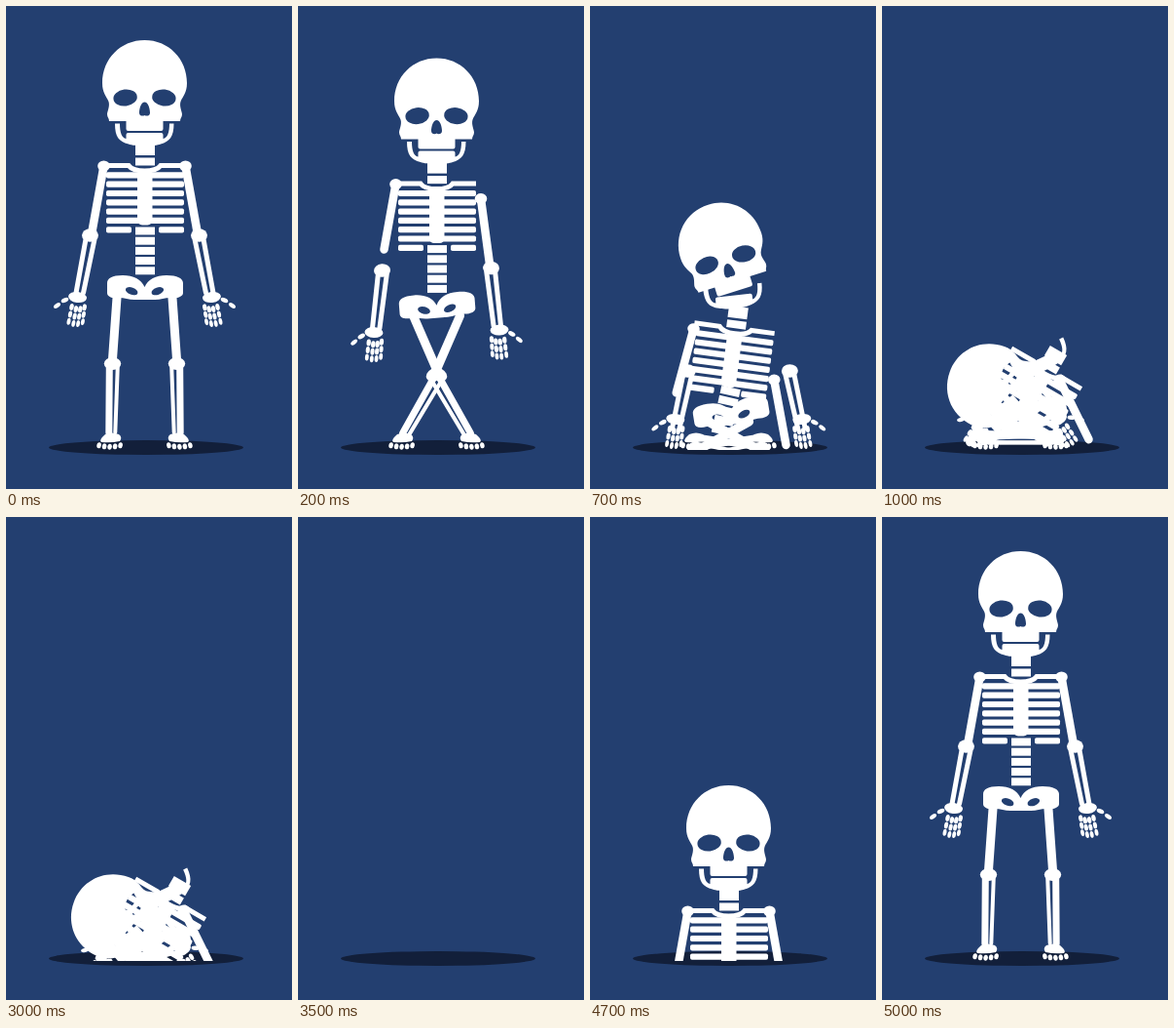
An HTML page that plays this animation: 294x495 px, repeating every 6000 ms.

```html
<!DOCTYPE html>
<html lang="en">
<head>
<meta charset="utf-8">
<title>Skeleton</title>
<style>
html, body { margin: 0; width: 100%; height: 100%; overflow: hidden; background: #233f70; }
svg { display: block; width: 100%; height: 100%; }
</style>
</head>
<body>
<svg viewBox="0 0 294 495">
  <clipPath id="floor"><rect width="294" height="455"/></clipPath>
  <ellipse cx="144" cy="452.5" rx="100" ry="7.5" fill="#121f3a"/>
  <g clip-path="url(#floor)"><g id="body" fill="#fff"></g></g>
</svg>
<script>
const LOOP = 6000, STEP = 100;
const body = document.getElementById('body');
const clamp = v => Math.max(0, Math.min(1, v));

// Shapes. Limbs are drawn for the left side only and mirrored for the right.
const rect = (x, y, w, h, r = 0) => `<rect x="${x}" y="${y}" width="${w}" height="${h}" rx="${r}"/>`;
const oval = (x, y, rx, ry, a = 0) =>
  `<ellipse cx="${x}" cy="${y}" rx="${rx}" ry="${ry}" transform="rotate(${a} ${x} ${y})"/>`;
const path = d => `<path fill-rule="evenodd" d="${d}"/>`;
const bone = (x1, y1, x2, y2, w) =>
  `<path d="M${x1} ${y1}L${x2} ${y2}" stroke="#fff" stroke-width="${w}" stroke-linecap="round"/>`;
const rows = (n, make) => Array.from({ length: n }, (_, i) => make(i)).join('');

const skull = path(`M142.5 35C167 35 186 54 186 79C186 89 182 92 179.5 98C178 103 181 108 181 111
  C181 114 179 115 179 118H161.5V126Q161.5 128 159.5 128H125.5Q123.5 128 123.5 126V118H106
  C106 115 104 114 104 111C104 108 107 103 105.5 98C103 92 99 89 99 79C99 54 118 35 142.5 35Z
  M110.5 95.5a12.2 8.2 -7 1 0 24.2 -3a12.2 8.2 -7 1 0 -24.2 3Z
  M174.5 95.5a12.2 8.2 7 1 1 -24.2 -3a12.2 8.2 7 1 1 24.2 3Z
  M142.5 98.5C146 98.5 148 105 148 109.5C148 113 144 113 142.5 112C141 113 137 113 137 109.5C137 105 139 98.5 142.5 98.5Z`);

const jaw = path(`M112 120.5H117C117 130 119 135 123.5 136V132Q123.5 130 125.5 130H159.5Q161.5 130 161.5 132V136
  C166 135 168 130 168 120.5H172.5C172.5 134 168 139 159 141.5C153 144 132 144 126 141.5C116 139 112 134 112 120.5Z`);

const chest = rect(133, 141, 20, 12) + rect(133, 155.5, 20, 8)
  + `<path d="M100 163.5H126Q130 169 142.5 169Q155 169 159 163.5H183" fill="none" stroke="#fff" stroke-width="5"/>`
  + rect(135, 168, 15.5, 56.5, 5)
  + rows(6, i => rect(103, 170.3 + i * 9.3, 80, 6.2, 1.8))
  + rect(103, 226.2, 26, 6.3, 1.8) + rect(157, 226.2, 26, 6.3, 1.8);

const spine = rows(5, i => rect(133, 226.5 + i * 10.2, 20, 8));

const pelvis = path(`M142.5 288C146 280 154 276 165 276C176 276 182 279 182 284V294C182 298 176 300 169 299
  C163 299 159 301 153 301H132C126 301 122 299 116 299C109 300 104 298 104 294V284
  C104 279 109 276 120 276C131 276 139 280 142.5 288Z
  M123 290a6.5 3.6 20 1 0 12.3 4.4a6.5 3.6 20 1 0 -12.3 -4.4Z
  M162 290a6.5 3.6 -20 1 1 -12.3 4.4a6.5 3.6 -20 1 1 12.3 -4.4Z`);

const arm = oval(100.5, 164, 6.3, 5.5) + bone(100, 167, 88.5, 231, 8.5);
const fore = oval(86.5, 235, 8.5, 6.8) + bone(82, 239, 72, 294, 5) + bone(91, 239, 79.5, 294, 5);
const finger = f => rows(3, i =>
  oval(67.5 + 4.4 * f - i * (1.5 - 0.2 * f), 308.5 + 2.5 * Math.sin(f) + 7.4 * i, 2.2 - 0.15 * i, 3.5, 10));
const hand = oval(73.5, 298.5, 9.5, 5.5, 8) + oval(60.5, 301.5, 4, 2.3, -25) + oval(52.5, 307, 4, 2.1, -35)
  + rows(4, finger);
const thigh = bone(114, 299, 109.5, 362, 9);
const shin = oval(109.5, 366.5, 8.7, 6.5) + bone(106.3, 369, 105.8, 437, 7) + bone(114.8, 369, 112.3, 437, 4);
const foot = path('M102 439Q109 436 116 439Q120 442 117 446Q108 448 98 447Q95 445 102 439Z')
  + rows(5, i => oval(95.6 + 5.5 * i, 450.3 + 1.5 * Math.sin(i * Math.PI / 4), 2.3, 3, 8));

// Collapse rules for step n of 10: everything drops, limbs go slack, then the heap tips over.
const drop = n => 311 * (n / 10) ** 1.75;
const slack = n => clamp(n / 4);
const tip = n => clamp((n - 4) / 6) ** 2;

// Falls at its own rate until it lands on the heap.
const fall = (dx, dy, turn, rate = 1, [slackX, slackTurn] = [0, 0], swing = 0) => n => {
  const k = tip(n);
  return [
    slackX * slack(n) + dx * k - swing * k * (1 - k),
    Math.min(drop(n) * rate, dy),
    slackTurn * slack(n) + turn * k
  ];
};

// The hip sinks over a fixed ankle and the knee folds inwards.
const HIP = [113.5, 298], KNEE = [109.5, 366], ANKLE = [108, 441], HIP_DROP = 128;
const gap = (a, b) => Math.hypot(b[0] - a[0], b[1] - a[1]);
const angle = (a, b) => Math.atan2(b[1] - a[1], b[0] - a[0]) * 180 / Math.PI;

function leg(n) {
  const upper = gap(HIP, KNEE), lower = gap(KNEE, ANKLE);
  const hip = [HIP[0] + 8 * slack(n) * (1 - 0.6 * tip(n)), HIP[1] + Math.min(drop(n), HIP_DROP)];
  const d = gap(hip, ANKLE), ux = (ANKLE[0] - hip[0]) / d, uy = (ANKLE[1] - hip[1]) / d;
  const along = (upper ** 2 - lower ** 2 + d * d) / (2 * d);
  const out = Math.sqrt(Math.max(0, upper ** 2 - along ** 2));
  return { hip, knee: [hip[0] + ux * along + uy * out, hip[1] + uy * along - ux * out] };
}
const rest = leg(0);
function moveThigh(n) {
  const { hip, knee } = leg(n);
  return [hip[0] - HIP[0], hip[1] - HIP[1], angle(hip, knee) - angle(rest.hip, rest.knee)];
}
function moveShin(n) {
  const { knee } = leg(n);
  return [knee[0] - rest.knee[0], knee[1] - rest.knee[1], angle(knee, ANKLE) - angle(rest.knee, ANKLE)];
}

const parts = [];
function group(parent) {
  const g = document.createElementNS('http://www.w3.org/2000/svg', 'g');
  parent.append(g);
  return g;
}
function add(parent, shape, pivot, move) {
  const g = group(parent);
  g.innerHTML = shape;
  parts.push({ g, pivot, move });
}

add(body, skull, [142.5, 79], fall(-31.5, 311, -70));
add(body, jaw, [142, 131], fall(21, 231, -25));
add(body, chest, [143, 200], fall(9, 204, 30));
add(body, spine, [143, 251], fall(-13, 164, 50));
add(body, pelvis, [143, 288], fall(8, HIP_DROP, 0, 1, [0, -9]));

function addLimbs(side, rate, swing, moveArm) {
  add(side, arm, [100, 164], moveArm);
  add(side, fore, [86, 235], fall(55, 139, 39, rate, [0, -8.5], swing));
  add(side, hand, [73, 299], fall(21, 125, 30, rate, [9, -8.5], swing));
  add(side, thigh, HIP, moveThigh);
  add(side, shin, KNEE, moveShin);
  group(side).innerHTML = foot;
}
const left = group(body), right = group(body);
right.setAttribute('transform', 'matrix(-1 0 0 1 285 0)');
addLimbs(left, 1.94, 0, fall(24, 224, 20));
addLimbs(right, 1.8, 110, fall(9, 219, 21, 1.8, [-7, -5]));

function sinkAt(t) {
  if (t < 3000) return 0;
  if (t < 3500) return (t - 2900) / 5;
  if (t < 4500) return 495;
  return Math.max(0, (5000 - t) * 0.8);
}

function draw(ms) {
  const t = Math.floor(ms % LOOP / STEP) * STEP;
  const n = t < 3500 ? Math.min(t / STEP, 10) : 0;
  body.setAttribute('transform', `translate(0 ${sinkAt(t)})`);
  for (const { g, pivot: [x, y], move } of parts) {
    const [dx, dy, turn] = move(n);
    g.setAttribute('transform', `translate(${x + dx} ${y + dy}) rotate(${turn}) translate(${-x} ${-y})`);
  }
}

const start = performance.now();
function tick() {
  draw(performance.now() - start);
  requestAnimationFrame(tick);
}
tick();
</script>
</body>
</html>
```
